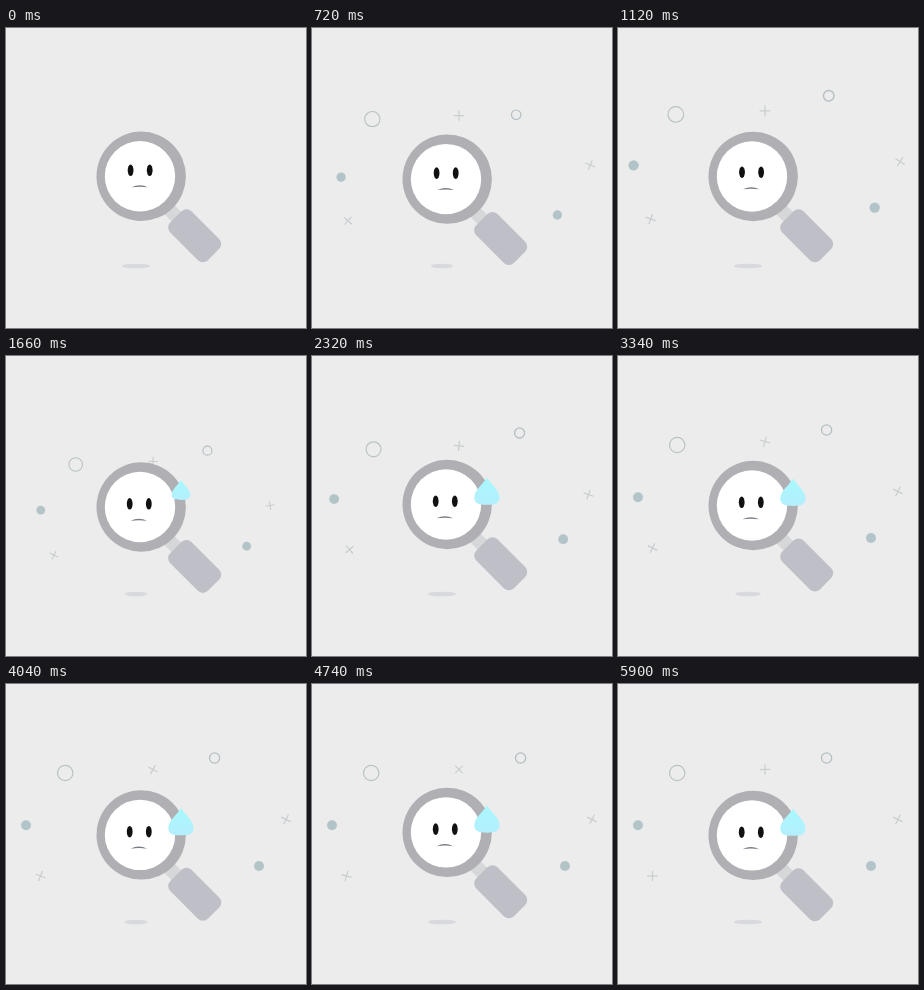
Animation of 300 by 300 pixels, one loop 5.92 s. Source, as an HTML page:

```html
<!DOCTYPE html>
<html lang="en">
<head>
<meta charset="utf-8">
<title>Nothing found</title>
<style>
html, body { margin: 0; height: 100%; overflow: hidden; background: #ececec; }
svg { display: block; width: 100vw; height: 100vh; }
</style>
</head>
<body>
<svg viewBox="0 0 300 300">
  <defs>
    <linearGradient id="water" x1="0" y1="0" x2="0" y2="1">
      <stop stop-color="#a8f8fd"/>
      <stop offset="1" stop-color="#b4effe"/>
    </linearGradient>
    <path id="plus" d="M-5.3 0H5.3M0 -5.3V5.3"/>
  </defs>
  <g id="outer" fill="none" stroke="#c9cdcf" stroke-width="1.2">
    <circle cx="59.2" cy="89" r="7.7" stroke="#b9c2c5"/>
  </g>
  <g id="inner" fill="#b3c4c9">
    <circle cx="20" cy="141.2" r="5"/>
    <circle cx="253" cy="182" r="5"/>
    <circle cx="208.6" cy="74" r="5.1" fill="none" stroke="#b4bfc3" stroke-width="1.3"/>
  </g>
  <ellipse id="shadow" cx="130" cy="238" ry="2.3" fill="#d7d9dd"/>
  <g id="glass">
    <path d="M157 175L178 196" stroke="#d6d7d8" stroke-width="13.5"/>
    <rect x="-26.6" y="-15" width="53.2" height="30" rx="7" fill="#bebfc7" transform="translate(188.7 207.4) rotate(45)"/>
    <circle cx="135.2" cy="148" r="44.7" fill="#b0b0b4"/>
    <circle cx="134" cy="148" r="35.2" fill="#fff"/>
    <g id="face">
      <ellipse cx="124.6" cy="142" rx="2.9" ry="5.8" fill="#111"/>
      <ellipse cx="143.7" cy="142" rx="2.9" ry="5.8" fill="#111"/>
      <path d="M125.5 159Q133.8 154.8 142 159Q133.8 157.8 125.5 159Z" fill="#777c84"/>
    </g>
    <path id="drop" fill="url(#water)" d="M175 121C171 128 162.3 133.5 162.3 141C162.3 147 167 148.4 175 148.4C183 148.4 187.6 147 187.6 141C187.6 133.5 179 128 175 121Z"/>
  </g>
</svg>
<script>
const LOOP = 5920, BOB = 1200, BOB_END = 5400;
const $ = id => document.getElementById(id);
const clamp = p => Math.min(1, Math.max(0, p));
const smooth = p => (1 - Math.cos(Math.PI * p)) / 2;
const ease = (t, from, to) => smooth(clamp((t - from) / (to - from)));
const place = (id, transform) => $(id).setAttribute("transform", transform);
const zoom = (id, x, y, s) => place(id, `translate(${x} ${y}) scale(${s}) translate(${-x} ${-y})`);

// Burst outwards, swing back too far, then settle at 1
const spread = (t, start, peak, dip, end) =>
  1.11 * ease(t, start, peak) - .24 * ease(t, peak, dip) + .13 * ease(t, dip, end);

// twist follows the spread, drift builds up slowly over the loop
const crosses = [
  { id: "top", x: 147, y: 85.5, angle: 0, twist: 0, drift: 90 },
  { id: "left", x: 34.5, y: 192, angle: 32, twist: -720, drift: -32 },
  { id: "right", x: 280, y: 135.5, angle: 27, twist: 300, drift: 0 }
];
$("outer").innerHTML += crosses.map(c => `<use id="${c.id}" href="#plus"/>`).join("");

function burst(id, s, t) {
  zoom(id, 147, 252, s);
  $(id).setAttribute("opacity", t > 1000 ? 1 : clamp((s - .64) / .1));
}

function draw(t) {
  const s = spread(t, 118, 887, 1430, 2700);
  burst("outer", s, t);
  burst("inner", spread(t, 100, 945, 1410, 2600), t);
  for (const c of crosses) {
    const turn = c.angle + c.twist * (s - 1) + c.drift * (t / LOOP) ** 3;
    place(c.id, `translate(${c.x} ${c.y}) rotate(${turn})`);
  }

  const bob = time => smooth(2 * time / BOB);
  place("glass", `translate(0 ${.3 + 3.1 * bob(Math.min(t, BOB_END))})`);
  $("shadow").setAttribute("rx", 14 - 3.2 * bob(t));

  const sad = ease(t, 700, 1400);
  place("face", `translate(${-.9 * sad} ${2.8 * sad})`);
  zoom("drop", 175, 121, ease(t, 1400, 1800));
}

function frame() {
  draw(performance.now() % LOOP);
  requestAnimationFrame(frame);
}
frame();
</script>
</body>
</html>
```
